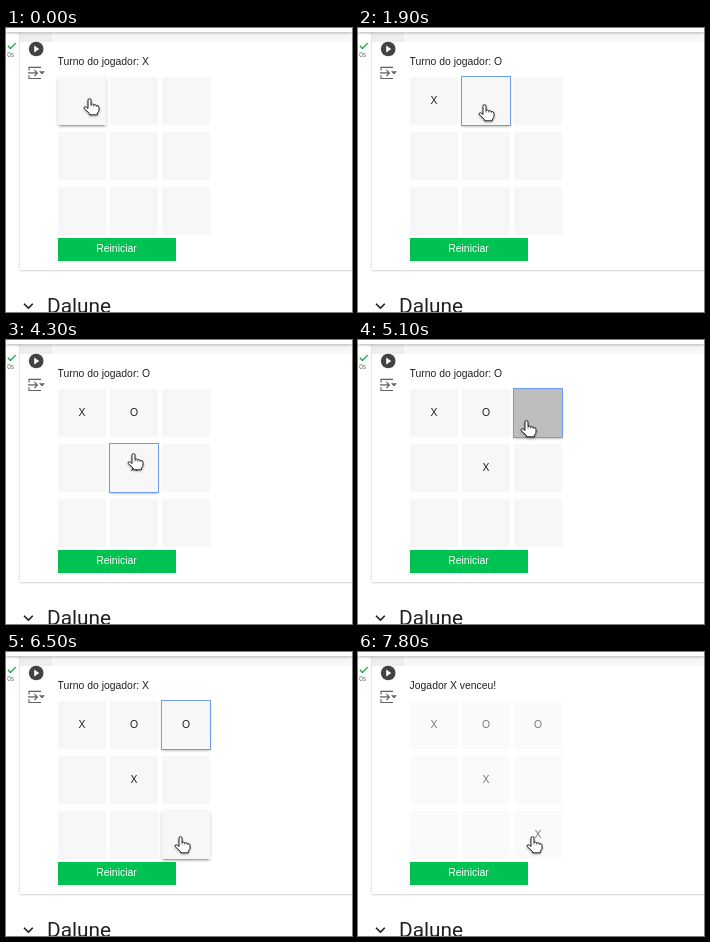
An HTML page that plays this animation: 346x284 px, repeating every 8000 ms.

```html
<!DOCTYPE html>
<html lang="pt">
<head>
<meta charset="utf-8">
<title>Jogo da velha</title>
<style>
  html, body { margin: 0; width: 100%; height: 100%; overflow: hidden; background: #fff; }
  #stage { position: relative; width: 346px; height: 284px; overflow: hidden; font: 10.4px/14px "Liberation Sans", Arial, sans-serif; color: #212121; }
  #stage > * { position: absolute; box-sizing: border-box; }
  #card { left: 14px; top: -10px; width: 350px; height: 252px; background: #fff; box-shadow: 0 0 2px rgba(0,0,0,.2), 0 1px 2px rgba(0,0,0,.1); }
  #code { left: 46px; top: 5px; width: 300px; height: 9px; background: #f7f7f7; }
  #gutter { left: 14px; top: 5px; width: 32px; height: 9px; background: #eee; }
  #bar { left: 0; top: 0; width: 346px; height: 4px; background: #fff; box-shadow: 0 1px 3px rgba(0,0,0,.3); }
  #label { left: 51.6px; top: 27px; white-space: pre; }
  .cell { width: 48px; height: 48px; line-height: 47px; text-align: center; background: #f7f7f7; }
  .raised { box-shadow: 0 2px 2px rgba(0,0,0,.14), 0 3px 1px -2px rgba(0,0,0,.2), 0 1px 4px rgba(0,0,0,.12); }
  .focused { outline: 1px solid #6f9cf0; }
  .pressed { background: #bdbdbd; }
  .disabled { opacity: .6; }
  #restart { left: 52px; top: 210px; width: 118px; height: 23px; line-height: 21px; padding-right: 1px; text-align: center; color: #fff; background: #00c250; }
  #heading { left: 41px; top: 266px; font: 20.8px/24px Roboto, sans-serif; }
  svg { left: 0; top: 0; }
  #cursor { filter: drop-shadow(0 1px .8px rgba(0,0,0,.35)); }
</style>
</head>
<body>
<div id="stage">
  <div id="card"></div>
  <div id="code"></div>
  <div id="gutter"></div>
  <div id="bar"></div>
  <div id="label"></div>
  <div id="restart">Reiniciar</div>
  <div id="heading">Dalune</div>
  <svg id="overlay" width="346" height="284" fill="none">
    <path d="M1.8 17.8l2.7 2.7 5.2-5.4" stroke="#1fa64a" stroke-width="1.3"/>
    <text x="1.2" y="29" font-size="6.4" fill="#666">0s</text>
    <circle cx="30.2" cy="21" r="7.3" fill="#424242"/>
    <path d="M28.2 17.6v6.8l5-3.4z" fill="#fff"/>
    <g stroke="#616161" stroke-width="1.2">
      <path d="M23 42.5v-3.2h12M23 47.2v3.3h12M22 44.9h9M28.4 41.8l3 3.1-3 3.1"/>
      <path d="M33 43.2h6l-3 3.2z" fill="#616161" stroke="none"/>
    </g>
    <path d="M18 275.7l4.4 4.4 4.4-4.4" stroke="#212121" stroke-width="1.6"/>
    <g id="cursor" stroke="#222" stroke-width="1" stroke-linejoin="round">
      <path fill="#fff" d="M5 10.6V2.2a1.5 1.5 0 0 1 3 0V6.6Q9.5 5.4 10.6 6.9Q12.2 6 13.2 7.6Q15.6 7 16 9.2V12.2Q15.8 14 14.4 15V16.8H6.4V15.4L1.2 10.6Q.6 9 2.2 8.8Q3.6 9 5 10.6Z"/>
      <path stroke-width=".6" d="M8 6.6V8.6M10.6 7V8.6M13.2 7.6V9"/>
    </g>
  </svg>
</div>
<script>
const LOOP = 8000, STEP = 100;

// Each turn: cell index, mark, and the times of press, release and reply.
const turns = [
  { cell: 0, mark: "X", down: 400, up: 600, reply: 1200 },
  { cell: 1, mark: "O", down: 1800, up: 1900, reply: 2600 },
  { cell: 4, mark: "X", down: 3600, up: 3700, reply: 4300 },
  { cell: 2, mark: "O", down: 5100, up: 5200, reply: 5900 },
  { cell: 8, mark: "X", down: 7000, up: 7100, reply: 7800 }
];

// Pointer moves: start time, then one position per step.
const moves = [
  { start: 0, points: [[77, 70]] },
  { start: 1200, points: [[90, 74], [104, 75], [114, 76], [120, 76]] },
  { start: 3000, points: [[120, 80], [120, 95], [120, 108], [120, 114]] },
  { start: 4300, points: [[121, 113], [132, 107], [147, 95], [157, 85], [162, 80]] },
  { start: 6100, points: [[163, 73], [165, 95], [167, 135], [168, 170], [168, 184]] }
];

const byId = id => document.getElementById(id);
const label = byId("label"), cursor = byId("cursor");

const cells = Array.from({ length: 9 }, (_, i) => {
  const el = document.createElement("div");
  const x = 52 + i % 3 * 52, y = 49 + Math.floor(i / 3) * 55;
  el.className = "cell";
  el.style.left = x + "px";
  el.style.top = y + "px";
  byId("stage").insertBefore(el, byId("overlay"));
  return { el, x, y };
});

function pointerAt(t) {
  const { start, points } = moves.findLast(m => m.start <= t);
  return points[Math.min(points.length - 1, Math.floor((t - start) / STEP))];
}

function draw(t) {
  const [px, py] = pointerAt(t);
  const played = turns.filter(turn => turn.reply <= t);
  const active = turns.findLast(turn => turn.down <= t);
  const won = played.length === turns.length;

  label.textContent = won ? "Jogador X venceu!" : "Turno do jogador: " + "XO"[played.length % 2];
  cursor.setAttribute("transform", `translate(${px} ${py})`);

  cells.forEach(({ el, x, y }, i) => {
    const dx = px + 6 - x, dy = py + 1 - y;
    const hovered = dx >= 0 && dx < 48 && dy >= 0 && dy < 48;
    const focused = active?.cell === i;
    el.textContent = played.find(turn => turn.cell === i)?.mark ?? "";
    el.classList.toggle("raised", !won && (hovered || focused));
    el.classList.toggle("focused", !won && focused);
    el.classList.toggle("pressed", focused && t < active.up);
    el.classList.toggle("disabled", won);
  });
}

function tick() {
  draw(performance.now() % LOOP);
  requestAnimationFrame(tick);
}
tick();
</script>
</body>
</html>
```
